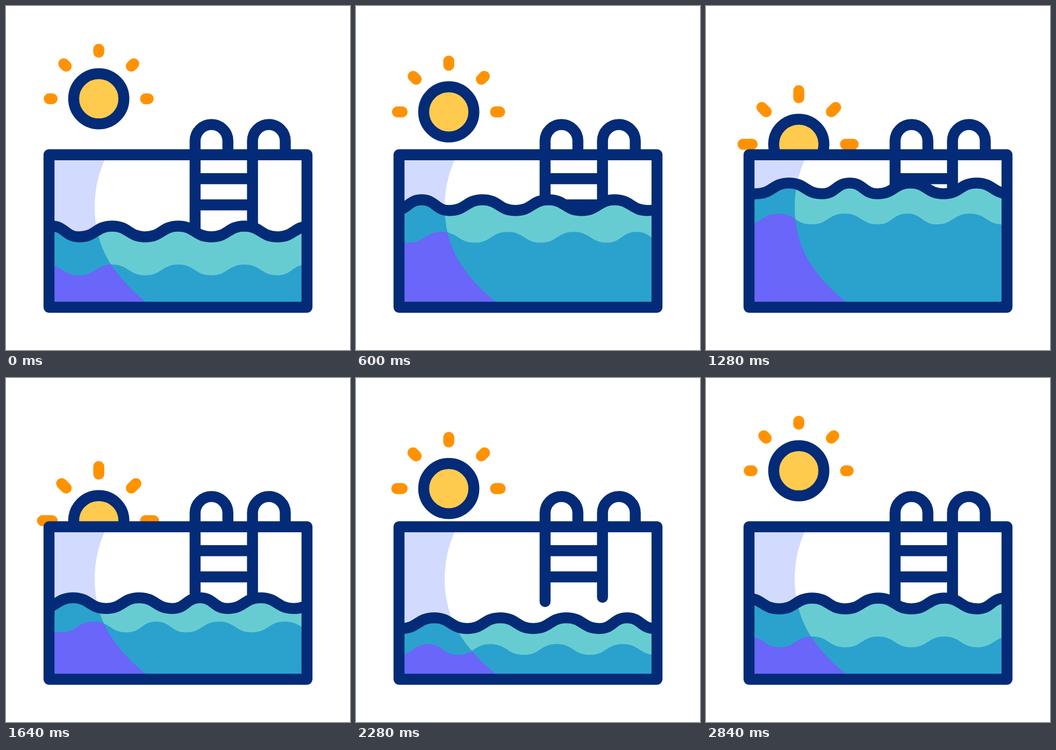
These frames come from a looping animation (640x640 px, 3000 ms). An HTML page:

```html
<!DOCTYPE html>
<html lang="en">
<head>
<meta charset="utf-8">
<title>Swimming pool</title>
<style>
  html, body { margin: 0; width: 100%; height: 100%; overflow: hidden; background: #fff; }
  svg { display: block; width: 100%; height: 100%; }
  .line { fill: none; stroke: #032b77; stroke-width: 20.4; stroke-linecap: round; stroke-linejoin: round; }
</style>
</head>
<body>
<svg viewBox="0 0 640 640">
  <defs>
    <clipPath id="sky"><rect width="640" height="277"/></clipPath>
    <clipPath id="pool"><rect x="85" y="282" width="470" height="273"/></clipPath>
    <clipPath id="shade">
      <path d="M184 285C171 314 165 343 165 375C165 410 174 445 191 474C208 502 232 529 266 555H80V285Z"/>
    </clipPath>
  </defs>

  <g clip-path="url(#sky)">
    <g id="sun">
      <path id="rays" fill="none" stroke="#ff9200" stroke-width="20.4" stroke-linecap="round"/>
      <circle cx="172.6" r="46.7" fill="#ffcb4f" stroke="#032b77" stroke-width="20.4"/>
    </g>
  </g>

  <g clip-path="url(#pool)">
    <rect x="85" y="282" width="470" height="273" fill="#d2dbfd" clip-path="url(#shade)"/>
  </g>

  <path class="line" d="M412.8 272V251a30.5 30.5 0 0 0-61 0V416M519.6 272V251a30.5 30.5 0 0 0-61 0V408M352 321.3H458M352 370H458"/>

  <g clip-path="url(#pool)">
    <path class="top" fill="#67ccd2"/>
    <path class="low" fill="#2aa2cd"/>
    <g clip-path="url(#shade)">
      <path class="top" fill="#2aa2cd"/>
      <path class="low" fill="#6966f9"/>
    </g>
    <path id="crest" class="line"/>
  </g>

  <rect class="line" x="80" y="276.7" width="480" height="283.8"/>
</svg>

<script>
const LOOP = 3000, STEP = 40, HALF = 61.5, AMP = 10;
const $ = s => document.querySelector(s);
const sun = $('#sun'), rays = $('#rays'), crest = $('#crest');

// Keys are [time, value]; every stretch eases in and out.
const SUN = [[120, 0], [1560, 1], [2760, 0]];
const TOP_Y = [[120, 419.5], [1080, 321.5], [2000, 469], [2840, 419.5]];
const LOW_Y = [[120, 491], [1040, 377], [2040, 510], [2760, 491]];
const TOP_X = [[130, 84.5], [2840, 556.5]];
const LOW_X = [[130, 560], [2840, 81]];

function track(t, keys) {
  if (t <= keys[0][0]) return keys[0][1];
  for (let i = 1; i < keys.length; i++) {
    const [t0, a] = keys[i - 1], [t1, b] = keys[i];
    if (t < t1) {
      const u = (t - t0) / (t1 - t0);
      return a + (b - a) * u * u * (3 - 2 * u);
    }
  }
  return keys[keys.length - 1][1];
}

// A wave with one narrower crest at x; "near" is its distance to the next trough.
function wave(x, y, near) {
  let d = '', px, py;
  for (let n = -10; n <= 10; n++) {
    const qx = x + (n && Math.sign(n) * (near + HALF * (Math.abs(n) - 1)));
    const qy = y + (n % 2 ? AMP : -AMP);
    const mid = (px + qx) / 2;
    d += d ? `C${mid} ${py} ${mid} ${qy} ${qx} ${qy}` : `M${qx} ${qy}`;
    px = qx;
    py = qy;
  }
  return d;
}

function fill(name, d) {
  document.querySelectorAll(name).forEach(p => p.setAttribute('d', d + 'V900H-700Z'));
}

function draw(t) {
  const s = track(t, SUN);
  sun.setAttribute('transform', `translate(0 ${172.6 + 94 * s})`);
  const side = 4.5 + 4 * s;
  rays.setAttribute('d',
    `M172.6 -86.6v${-(5.6 + 8.5 * s)}` +
    `M85.8 0h${-(5.4 + 12.8 * s)}M259.6 0h${5 + 10.2 * s}` +
    `M112 -60.6l${-side} ${-side}M233.2 -60.6l${side} ${-side}`);

  const top = wave(track(t, TOP_X), track(t, TOP_Y), 51.5);
  fill('.top', top);
  crest.setAttribute('d', top);
  fill('.low', wave(track(t, LOW_X), track(t, LOW_Y), 55));
}

const start = performance.now();
function tick() {
  const t = (performance.now() - start) % LOOP;
  draw(Math.floor(t / STEP) * STEP);
  requestAnimationFrame(tick);
}
tick();
</script>
</body>
</html>
```
